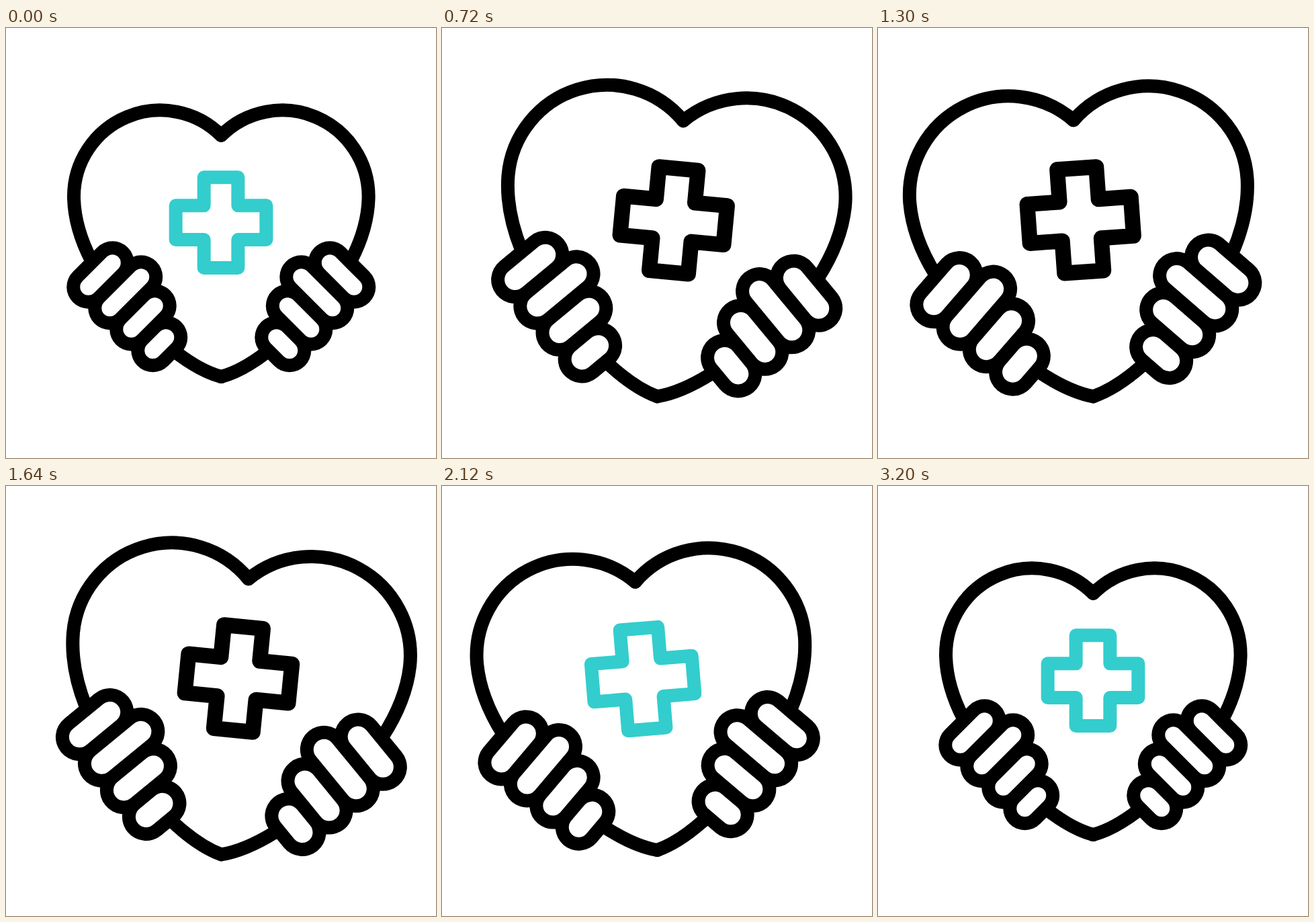
Recreate the animation shown at these times as an HTML page. Size 640 px wide and 640 px high, loop 3.4 s.

```html
<!DOCTYPE html>
<html lang="en">
<head>
<meta charset="utf-8">
<title>Caring hands</title>
<style>
html, body { margin: 0; width: 100%; height: 100%; overflow: hidden; background: #fff; }
svg { display: block; width: 100vw; height: 100vh; }
</style>
</head>
<body>
<svg viewBox="0 0 640 640" fill="none" stroke-linecap="round" stroke-linejoin="round">
  <defs>
    <path id="side" d="M320.3 160A128.5 128.5 0 0 0 101 252C101.5 284 111 315 127 346M254 483.5Q290 511 320.3 519"/>
    <path id="fingers"/>
  </defs>
  <g id="body">
    <g id="heart" stroke="#000">
      <use href="#side"/>
      <use href="#side" transform="translate(640.6) scale(-1 1)"/>
    </g>
    <g id="outer" stroke="#000">
      <use href="#fingers"/>
      <use href="#fingers" transform="translate(640.5) scale(-1 1)"/>
    </g>
    <g id="inner" stroke="#fff">
      <use href="#fingers"/>
      <use href="#fingers" transform="translate(640.5) scale(-1 1)"/>
    </g>
    <path id="cross"/>
  </g>
  <path id="rays" stroke="#33cdcd" stroke-width="20"/>
</svg>
<script>
const LOOP = 3400, BEAT = 400, STROKE = 20, FINGER = 44.5, TEAL = '#33cdcd';
const GROWN = 1.148, SWING = 6;
const [body, heart, outer, inner, fingers, cross, rays] =
  ['body', 'heart', 'outer', 'inner', 'fingers', 'cross', 'rays'].map(id => document.getElementById(id));

const set = (node, attributes) => {
  for (const name in attributes) node.setAttribute(name, attributes[name]);
};
const mix = (a, b, u) => a + (b - a) * u;
const ease = u => {
  u = Math.min(1, Math.max(0, u));
  return u * u * (3 - 2 * u);
};

// Four parallel fingers, evenly spaced down the diagonal
set(fingers, {
  d: [36, 46.5, 35, 19.5].map((reach, i) =>
    `M${122.5 + 32 * i} ${385.5 + 31.5 * i}l${reach} ${-reach}`).join('')
});

function crossPath(x, y, bar, arm) {
  return `M${x - bar / 2} ${y - bar / 2 - arm}h${bar}v${arm}h${arm}v${bar}h${-arm}v${arm}` +
    `h${-bar}v${-arm}h${-arm}v${-bar}h${arm}z`;
}
set(cross, { d: crossPath(320, 289.7, 50.7, 42) });

// Three rays above and three below, drawn from the heart outwards
function rayPath(tail, tip) {
  let d = '';
  for (const down of [-1, 1]) {
    for (const side of [-1, 0, 1]) {
      const point = u => side
        ? `${320 + side * (34.5 + 32 * u)} ${320 + down * (232 + 32 * u)}`
        : `320 ${320 + down * (234 + 44.5 * u)}`;
      d += `M${point(tail)}L${point(tip)}`;
    }
  }
  return d;
}

// Eases from the pose of one beat to the pose of the next
function between(pose, t) {
  const beat = Math.floor(t / BEAT);
  return mix(pose(beat), pose(beat + 1), ease(t / BEAT - beat));
}
const scalePose = beat => beat > 0 && beat < 6 ? GROWN : 1;
const swingPose = beat => beat > 1 && beat < 6 ? SWING * (-1) ** beat : 0;

function draw(t) {
  const scale = between(scalePose, t);
  const width = STROKE / scale;
  const pivotY = 320 + 199 * scale;
  set(body, {
    transform: `rotate(${between(swingPose, t)} 320 ${pivotY}) ` +
      `translate(320 320) scale(${scale}) translate(-320 -320)`
  });
  set(heart, { 'stroke-width': width });
  set(outer, { 'stroke-width': FINGER + width });
  set(inner, { 'stroke-width': FINGER - width });

  const dark = t >= 600 && t < 2000;
  set(cross, { stroke: dark ? '#000' : TEAL, 'stroke-width': width * (dark ? 1.15 : 1) });

  const burst = t < 2800 ? t - 2220 : t - 2800;
  const tip = ease(burst / 200), tail = ease(burst / 200 - 1);
  set(rays, { d: tip > tail ? rayPath(tail, tip) : '' });
}

const start = performance.now();
function tick() {
  draw((performance.now() - start) % LOOP);
  requestAnimationFrame(tick);
}
draw(0);
requestAnimationFrame(tick);
</script>
</body>
</html>
```
